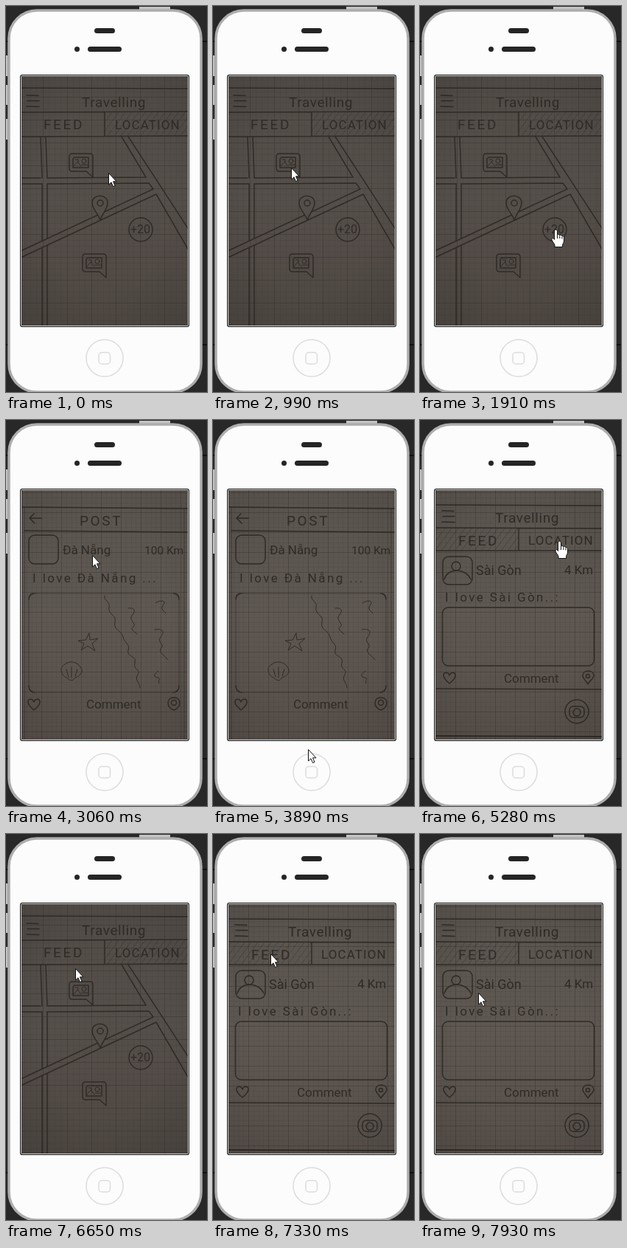
Animation, 273 px wide and 523 px high, one loop 8000 ms. Source, as an HTML page:

```html
<!DOCTYPE html>
<html lang="en">
<head>
<meta charset="utf-8">
<title>Travel app prototype</title>
<style>
html, body { margin: 0; width: 100%; height: 100%; overflow: hidden; background: #282828; }
svg { display: block; width: 273px; height: 523px; }
.screen { fill: none; stroke: #302b27; stroke-width: 1.5; stroke-linecap: round; stroke-linejoin: round; }
.screen text { fill: #302b27; stroke: none; font: 17px Roboto, "Open Sans", sans-serif; }
.screen .title { font-size: 19px; letter-spacing: .6px; }
.screen .feed { font-size: 19px; letter-spacing: 2.6px; }
.screen .loc { font-size: 17px; letter-spacing: 1.1px; }
.screen .note { letter-spacing: 2.4px; }
.screen .place { font-size: 18px; }
.thin { stroke-width: 1; }
.cursor { fill: #fff; stroke: #111; stroke-width: 1; stroke-linejoin: round; }
#tip text { font: 600 12.5px "Open Sans", sans-serif; fill: #fff; text-anchor: middle; }
</style>
</head>
<body>
<svg viewBox="0 0 273 523">
  <defs>
    <linearGradient id="paper" x2="0" y2="1">
      <stop stop-color="#5b554f"/><stop offset=".5" stop-color="#5f5852"/><stop offset="1" stop-color="#574f4a"/>
    </linearGradient>
    <radialGradient id="shade" r=".75"><stop offset=".5" stop-opacity="0"/><stop offset="1" stop-opacity=".1"/></radialGradient>
    <pattern id="wide" x="17" y="123" width="33" height="31" patternUnits="userSpaceOnUse">
      <path d="M8.5 0V31M16.5 0V31M24.5 0V31M0 8.5H33M0 16.5H33M0 24.5H33" stroke="#2a2623" stroke-opacity=".1"/>
      <path d="M.5 0V31M0 .5H33" stroke="#2a2623" stroke-opacity=".33"/>
    </pattern>
    <pattern id="close" x="21" y="98" width="27" height="27" patternUnits="userSpaceOnUse">
      <path d="M7.5 0V27M14.5 0V27M20.5 0V27M0 7.5H27M0 14.5H27M0 20.5H27" stroke="#2a2623" stroke-opacity=".1"/>
      <path d="M.5 0V27M0 .5H27" stroke="#2a2623" stroke-opacity=".33"/>
    </pattern>
    <pattern id="hatch" width="9" height="12" patternUnits="userSpaceOnUse">
      <path d="M-1 13.3L10-1.3" stroke="#24211f" stroke-opacity=".35"/>
    </pattern>
    <clipPath id="glass"><path d="M21 95H247V433H21z"/></clipPath>
    <path id="menu" d="M0 0L16 .5M1 7.5H17M0 15L17 15.5"/>
    <path id="heart" d="M0 8C-5 4-8 1-8-3C-8-8-2-8 0-3C2-8 8-8 8-3C8 1 5 4 0 8z"/>
    <g id="bubble">
      <path d="M4 0H28Q32 0 32 4V32L23 24H4Q0 24 0 20V4Q0 0 4 0z"/>
      <path d="M7 5H26V19H5V7z"/>
      <path class="thin" d="M6 17L11 11L16 17M8 8H12V11M17 15H25"/>
      <circle class="thin" cx="20" cy="10" r="3"/>
    </g>
  </defs>

  <!-- Phone -->
  <path fill="#282828" d="M0 0H273V523H0z"/>
  <path fill="#111" d="M0 47H4V49H0zM265 47H273V49H265zM0 458H4V460H0zM265 458H273V460H265z"/>
  <path fill="#c4c4c4" d="M0 67H2.500V95H0zM0 107H2.500V134H0zM0 153H2.500V181H0zM181 1H223V5H181z"/>
  <rect x="4" y="6" width="261" height="517" rx="38" fill="#fcfcfc" stroke="#adadad" stroke-width="3.500"/>
  <g fill="#252525">
    <rect x="120" y="30" width="28" height="7" rx="3.500"/>
    <rect x="111" y="55" width="46" height="7" rx="3.500"/>
    <circle cx="96.500" cy="58.500" r="3.500"/>
  </g>
  <g fill="none" stroke="#dcdcdc" stroke-width="1.500">
    <circle cx="134" cy="477" r="25"/>
    <rect x="126" y="469.500" width="15.500" height="15.500" rx="4"/>
  </g>
  <rect x="19" y="93" width="230" height="342" rx="3" fill="#111"/>
  <rect x="20.500" y="94.500" width="227" height="339" rx="1" fill="none" stroke="#d8d8d8"/>

  <g clip-path="url(#glass)">
    <path fill="url(#paper)" d="M21 95H247V433H21z"/>

    <g id="map" class="screen">
      <path fill="#000" fill-opacity=".1" stroke="none" d="M21 95H247V433H21z"/>
      <path fill="url(#wide)" stroke="none" d="M21 95H247V433H21z"/>
      <path fill="url(#hatch)" stroke="none" d="M134 144H247V176H134z"/>
      <path d="M22 111L247 112M22 144L247 143M22 177L247 176M134 144V176"/>
      <use href="#menu" x="28" y="121"/>
      <text class="title" x="103" y="137">Travelling</text>
      <text class="feed" x="51" y="167">FEED</text>
      <text class="loc" x="148" y="167">LOCATION</text>
      <path d="M47 177L49 233M49 241V318M49 328V433M54 177L56 233M56 241L56 315M56 324V433"/>
      <path d="M22 233H47M56 233L190 232L157 177M22 241H49M56 241L194 240L200 248L22 331M166 177L247 301M22 340L204 255L247 329"/>
      <use href="#bubble" x="86" y="200"/>
      <use href="#bubble" x="104" y="336"/>
      <path fill="#544e48" d="M128 290C125 281 117 275 117 267C117 254 138 254 138 267C138 275 131 281 128 290z"/>
      <circle cx="128" cy="267" r="4"/>
      <circle cx="183" cy="303" r="16"/>
      <text x="169" y="308" style="font-size:16px">+20</text>
    </g>

    <g id="post" class="screen">
      <path fill="url(#close)" stroke="none" d="M21 95H247V433H21z"/>
      <path d="M22 118L247 120M25 150L247 152"/>
      <path class="thin" stroke-opacity=".6" d="M25 118V433M242 120V433"/>
      <path d="M48 133H32L38 127M32 133L39 140"/>
      <text class="feed" x="100" y="143">POST</text>
      <rect x="31" y="156" width="40" height="39" rx="8"/>
      <text x="77" y="182">Đà Nẵng</text>
      <text x="188" y="182" style="font-size:15.5px">100 Km</text>
      <text class="note" x="36" y="220">I love Đà Nẵng ...</text>
      <rect class="thin" x="31" y="235" width="204" height="134" rx="9" stroke-opacity=".6"/>
      <path d="M31 243Q31 235 38 235M228 235Q235 235 235 243M31 360Q31 369 39 369M227 369Q235 369 235 360"/>
      <path class="thin" d="M134 238C132 246 142 244 140 254S151 264 148 274S157 285 159 294S169 303 166 312S178 319 175 329S184 337 179 345S182 355 182 363"/>
      <path class="thin" d="M166 255C176 254 176 259 171 265S178 276 173 280S174 286 178 290M203 248C210 243 218 245 214 250S212 257 217 262M202 284C213 282 216 287 210 294S216 303 211 309S216 319 220 325M207 340C200 345 200 348 206 349S205 354 208 357"/>
      <path class="thin" d="M113 289L114 298L125 296L117 303L121 313L111 306L102 312L106 303L98 299L108 298z"/>
      <path class="thin" d="M82 349C73 345 73 334 80 331C87 325 98 328 102 336C106 343 98 348 94 349L90 353L86 352zM82 338L85 348M89 335V349M97 338L94 347"/>
      <use href="#heart" x="38" y="385"/>
      <text x="109" y="391">Comment</text>
      <path d="M228 393C217 389 218 376 228 376S239 389 228 393z"/>
      <circle cx="228" cy="383" r="3.500"/>
    </g>

    <g id="feed" class="screen">
      <path fill="url(#close)" stroke="none" d="M21 95H247V433H21z"/>
      <path fill="url(#hatch)" stroke="none" d="M22 147H133V176H22z"/>
      <path d="M22 115L247 116M22 146L247 147M22 177H247M134 147V177M22 364L247 365"/>
      <path stroke-width="2" d="M22 428L247 429"/>
      <use href="#menu" x="30" y="123"/>
      <text class="title" x="102" y="139">Travelling</text>
      <text class="feed" x="52" y="170">FEED</text>
      <text class="loc" x="147" y="169">LOCATION</text>
      <rect x="31" y="185" width="40" height="38" rx="8"/>
      <circle cx="49" cy="198" r="6"/>
      <path d="M33 216C37 200 62 200 69 216"/>
      <text class="place" x="76" y="210">Sài Gòn</text>
      <text x="196" y="209">4 Km</text>
      <text class="note" x="34" y="246">I love Sài Gòn..:</text>
      <rect x="30.500" y="254" width="206" height="79" rx="8"/>
      <use href="#heart" x="40" y="349"/>
      <text x="114" y="356">Comment</text>
      <path d="M228 358C226 353 221 351 221 346C221 338 236 338 236 346C236 351 230 353 228 358z"/>
      <circle cx="228" cy="347" r="2.500"/>
      <circle cx="213" cy="395" r="16"/>
      <rect x="203" y="388" width="20" height="15" rx="5"/>
      <circle cx="213" cy="396" r="5"/>
    </g>

    <path fill="url(#shade)" d="M21 95H247V433H21z"/>
  </g>

  <g id="tip">
    <path d="M99 404H191Q195 404 195 408V438Q195 442 191 442H152L145 449L138 442H99Q95 442 95 438V408Q95 404 99 404z"/>
    <text x="145.500" y="427">Jump to start</text>
  </g>
  <path id="arrow" class="cursor" d="M.5 .5V16L4 12.800L6.500 18.500L9 17.500L6.500 11.800H11z"/>
  <path id="hand" class="cursor" d="M-2.500 13.500V2a2 2 0 0 1 4 0V7.500a1.800 1.800 0 0 1 3.300 .5a1.800 1.800 0 0 1 3.200 1a1.600 1.600 0 0 1 2.500 1.500V15c0 3-2 4-2 6.500V23.500H-2V21C-2 19-6 15.500-6 13.500C-6 11-4 11-2.500 13.500zM1.500 7.500V12M4.800 8.500V12M8 9.500V12.500"/>
</svg>
<script>
const LOOP = 8000;
const el = id => document.getElementById(id);
const show = (id, on) => { el(id).style.display = on ? "" : "none"; };

const cuts = [[0, "map"], [2190, "post"], [4430, "feed"], [5670, "map"], [7210, "feed"]];

// Bursts of pointer motion: start, end, number of steps
const bursts = [[120, 690, 5], [990, 1910, 8], [2760, 3740, 8], [3890, 4850, 8], [5000, 5280, 3],
  [5670, 6090, 4], [6380, 6380, 1], [6650, 7630, 8], [7790, 7930, 2]];

// Pointer path: time, x, y
const path = [[0, 139, 226], [690, 102, 215], [860, 102, 215], [1910, 185, 303], [2620, 185, 303],
  [3040, 117, 183], [3320, 56, 152], [3740, 122, 412], [4027, 135, 476], [4439, 135, 476],
  [4850, 148, 263], [5280, 190, 164], [5670, 190, 164], [6090, 102, 211], [6380, 102, 210],
  [6510, 102, 210], [6650, 94, 182], [6930, 78, 162], [7210, 78, 162], [7630, 86, 187], [7930, 79, 215]];

// Clickable areas: left, top, right, bottom
const links = {
  map: [[21, 142, 134, 177], [166, 285, 203, 321]],
  feed: [[134, 142, 247, 177]],
  post: []
};

function stepTime(t) {
  const burst = bursts.filter(b => b[0] <= t).pop();
  if (!burst) return 0;
  const [a, b, n] = burst;
  if (t >= b) return b;
  const gap = (b - a) / (n - 1);
  return a + Math.floor((t - a) / gap) * gap;
}

function pointer(t) {
  const i = path.findIndex(p => p[0] > t);
  if (i < 0) return path[path.length - 1].slice(1);
  const [a, x, y] = path[i - 1], [b, x2, y2] = path[i];
  const u = (t - a) / (b - a), e = u * u * (3 - 2 * u);
  return [x + (x2 - x) * e, y + (y2 - y) * e];
}

function draw() {
  const t = performance.now() % LOOP;
  const screen = cuts.filter(c => c[0] <= t).pop()[1];
  const [x, y] = pointer(stepTime(t)).map(Math.round);
  const home = Math.hypot(x - 134, y - 477) < 25;
  const hand = home || links[screen].some(([l, top, r, b]) => x >= l && x <= r && y >= top && y <= b);
  for (const id in links) show(id, id === screen);
  show("tip", home);
  show("hand", hand);
  show("arrow", !hand);
  el(hand ? "hand" : "arrow").setAttribute("transform", `translate(${x} ${y})`);
  requestAnimationFrame(draw);
}
draw();
</script>
</body>
</html>
```
